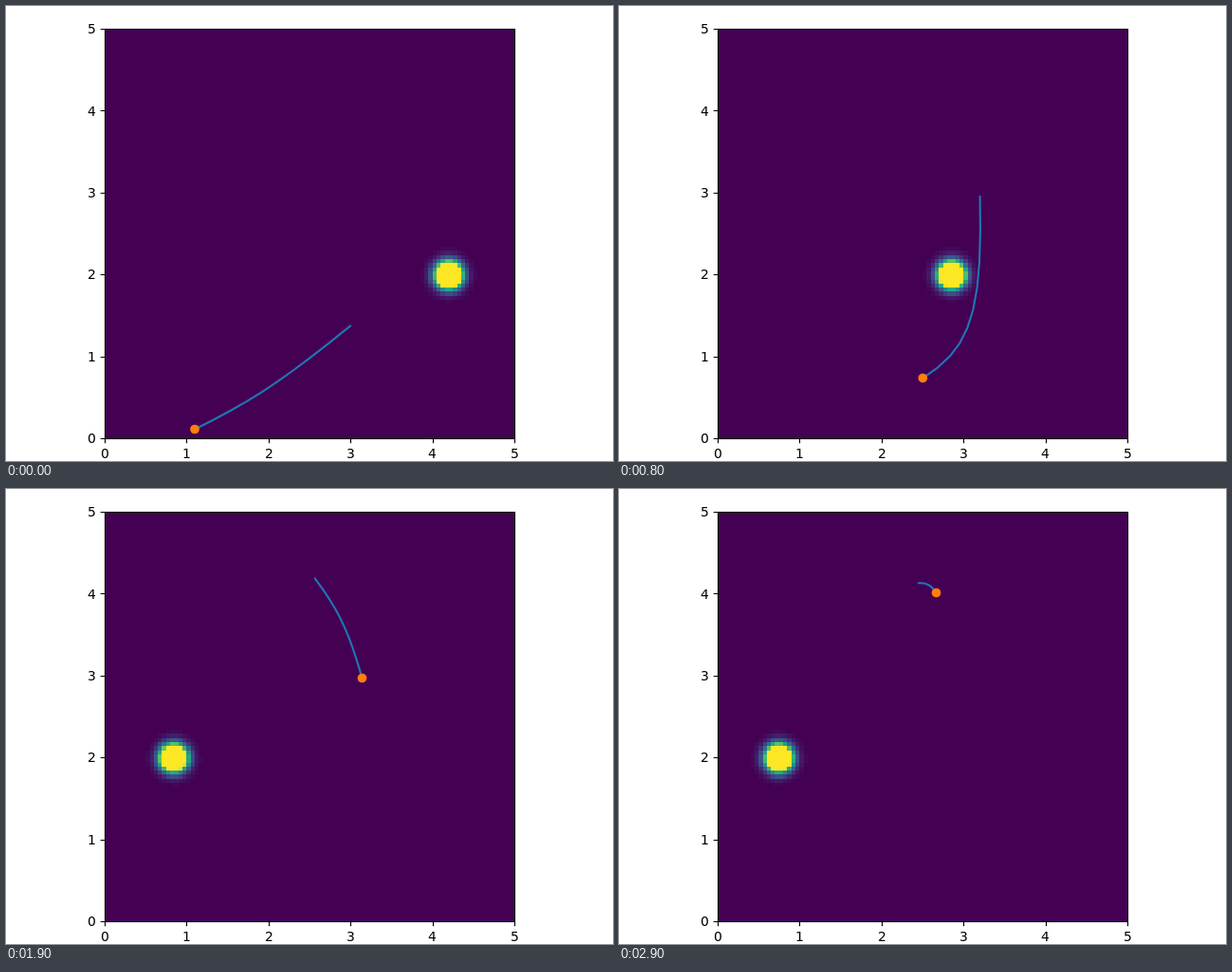
An HTML page for the animation above (3000 ms loop, 640x480 px).

```html
<!DOCTYPE html>
<html lang="en">
<head>
<meta charset="utf-8">
<title>Path planning around a moving obstacle</title>
<style>
  html, body { margin: 0; width: 100%; height: 100%; overflow: hidden; background: #fff; }
  svg { display: block; width: 640px; height: 480px; }
  text { font: 13.89px "DejaVu Sans", sans-serif; }
</style>
</head>
<body>
<svg id="stage" viewBox="0 0 640 480">
  <rect x="104" y="24" width="432" height="432" fill="#440154"/>
  <g id="field" shape-rendering="crispEdges"></g>
  <polyline id="plan" fill="none" stroke="#1f77b4" stroke-width="2.08" stroke-linecap="square" stroke-linejoin="round"/>
  <circle id="robot" r="4.86" fill="#ff7f0e"/>
  <rect x="104.5" y="24.5" width="432" height="432" fill="none" stroke="#000" stroke-width="1.11"/>
  <g id="axes" stroke="#000" stroke-width="1.11"></g>
  <g id="labels"></g>
</svg>
<script>
const LOOP = 3000, STEP = 100;
const LEFT = 104, BOTTOM = 456, UNIT = 86.4, CELL = 4.32;
const SPAN = 7, SIDE = 2 * SPAN + 1;
const viridis = ['440154', '414487', '2a788e', '22a884', '7ad151', 'fde725']
  .map(h => [0, 2, 4].map(i => parseInt(h.slice(i, i + 2), 16)));

// Planned route: time, robot, corner the route bends towards, end of the horizon.
const plans = [
  [0, 199, 446.5, 275, 409, 363, 337.5],
  [400, 249.5, 419.5, 344, 387, 393, 273.5],
  [800, 320.3, 392.5, 384, 353, 380.6, 201],
  [1200, 371, 334, 386, 260, 357, 126],
  [1500, 383.3, 273.3, 384, 203, 339.5, 105],
  [1900, 375.5, 199.5, 357.5, 137, 325.8, 94.5],
  [2300, 357.5, 147.5, 343, 115, 319, 94.8],
  [2900, 334.5, 109.5, 327, 99, 316, 99.3]
];

const $ = id => document.getElementById(id);

function add(parent, tag, attrs, text = '') {
  const el = document.createElementNS('http://www.w3.org/2000/svg', tag);
  set(el, attrs).textContent = text;
  return parent.appendChild(el);
}

function set(el, attrs) {
  for (const k in attrs) el.setAttribute(k, attrs[k]);
  return el;
}

function drawAxes() {
  for (let v = 0; v <= 5; v++) {
    const x = LEFT + v * UNIT, y = BOTTOM - v * UNIT;
    const tx = Math.round(x) + 0.5, ty = Math.round(y) + 0.5;
    add($('axes'), 'path', { d: `M${tx} 456.5v4.86M104.5 ${ty}h-4.86` });
    add($('labels'), 'text', { x: Math.round(x - 4.2), y: 477 }, v);
    add($('labels'), 'text', { x: 86, y: Math.round(y + 5.28) }, v);
  }
}

const mix = (a, b, u) => a + (b - a) * u;

function color(v) {
  const p = Math.min(1, v) * 5, i = Math.min(4, Math.floor(p));
  return `rgb(${viridis[i].map((c, k) => Math.round(mix(c, viridis[i + 1][k], p - i)))})`;
}

const cells = Array.from({ length: SIDE * SIDE }, () => add($('field'), 'rect', {}));
const edge = i => Math.round(i * CELL);

// A capped Gaussian bump sampled on a 100 x 100 grid over 0..5.
function drawObstacle(k) {
  const grid = v => v * 99 / 5;
  const cx = grid(2.5 + 2 * Math.cos(0.54 + 0.1064 * k)), cy = grid(2);
  cells.forEach((cell, n) => {
    const i = Math.round(cx) - SPAN + n % SIDE;
    const j = Math.round(cy) - SPAN + Math.floor(n / SIDE);
    const v = Math.exp((9 - (i - cx) ** 2 - (j - cy) ** 2) / 8.5);
    set(cell, {
      x: LEFT + edge(i), y: BOTTOM + 1 - edge(j + 1),
      width: edge(i + 1) - edge(i), height: edge(j + 1) - edge(j),
      fill: color(v), display: v < 0.015 || i < 0 ? 'none' : 'inline'
    });
  });
}

function slope(i, c) {
  const a = plans[Math.max(0, i - 1)], b = plans[Math.min(plans.length - 1, i + 1)];
  return (b[c] - a[c]) / (b[0] - a[0]);
}

// Smooth interpolation of column c between key times.
function planAt(t, c) {
  let i = 0;
  while (i < plans.length - 2 && t >= plans[i + 1][0]) i++;
  const a = plans[i], b = plans[i + 1], h = b[0] - a[0], s = (t - a[0]) / h, r = 1 - s;
  return r * r * (1 + 2 * s) * a[c] + s * s * (1 + 2 * r) * b[c]
    + h * s * r * (r * slope(i, c) - s * slope(i + 1, c));
}

// Cubic from a to b whose handles reach most of the way to corner q.
function bend(a, q, b, u) {
  const w = 1 - u, c = mix(a, q, 0.8), d = mix(b, q, 0.8);
  return w ** 3 * a + 3 * u * w * (w * c + u * d) + u ** 3 * b;
}

function drawPlan(t) {
  const [x, y, qx, qy, ex, ey] = [1, 2, 3, 4, 5, 6].map(c => planAt(t, c));
  const points = [];
  for (let n = 0; n < 10; n++) points.push([bend(x, qx, ex, n / 9), bend(y, qy, ey, n / 9)]);
  set($('plan'), { points: points.join(' ') });
  set($('robot'), { cx: x, cy: y });
}

let shown = -1;
function render(ms) {
  const k = Math.floor((ms % LOOP) / STEP);
  if (k === shown) return;
  shown = k;
  drawObstacle(k);
  drawPlan(k * STEP);
}

drawAxes();
render(0);
let start;
requestAnimationFrame(function tick(now) {
  if (start === undefined) start = now;
  render(now - start);
  requestAnimationFrame(tick);
});
</script>
</body>
</html>
```
